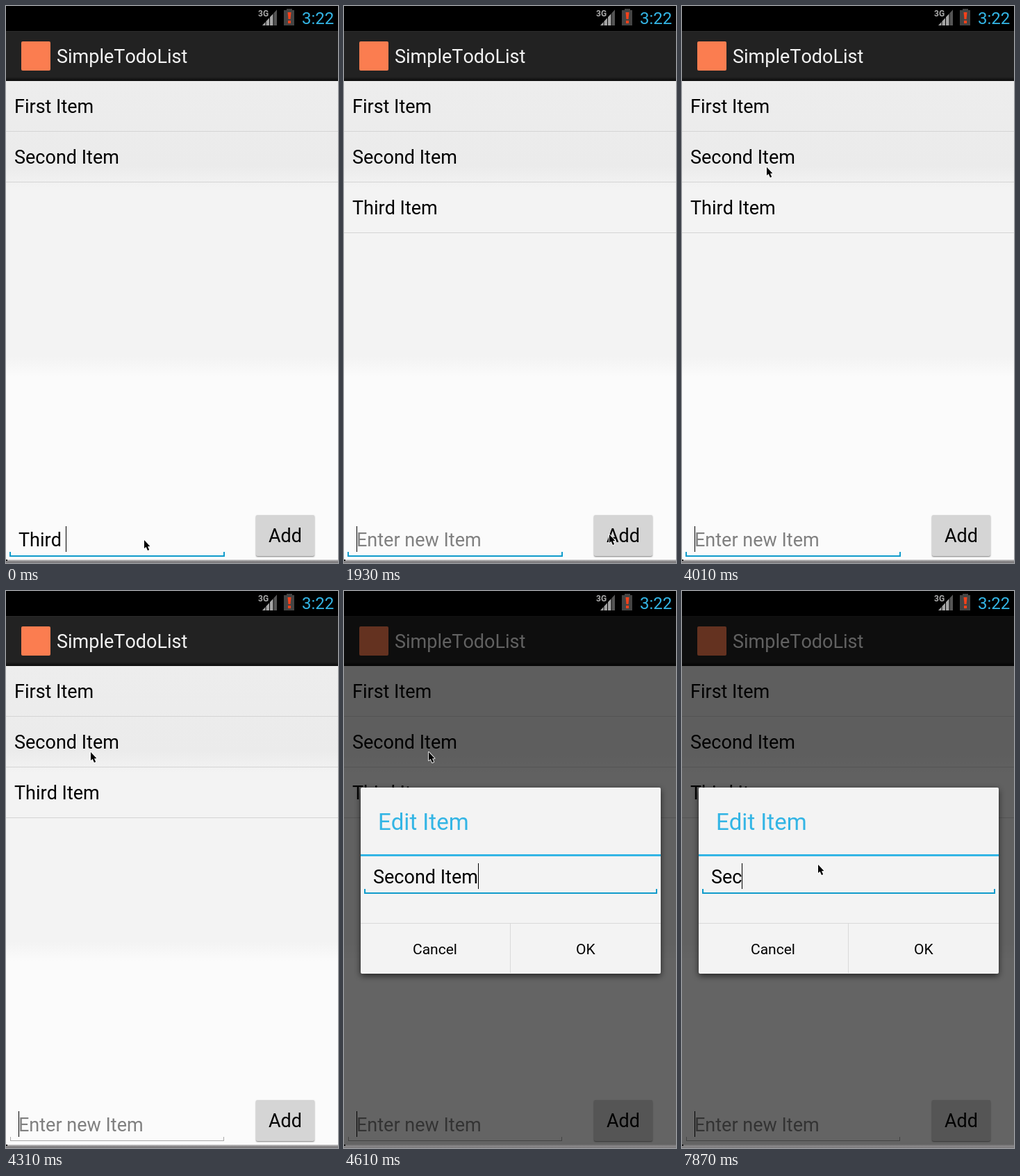
An HTML page with a canvas that plays this animation: 478 by 802 pixels, repeating every 8000 ms.

```html
<!DOCTYPE html>
<html lang="en">
<head>
<meta charset="utf-8">
<style>
html, body { margin: 0; width: 478px; height: 802px; overflow: hidden; background: #000; }
canvas { display: block; }
</style>
</head>
<body>
<canvas width="478" height="802"></canvas>
<script>
const LOOP = 8000;
const ctx = document.querySelector('canvas').getContext('2d');
ctx.fontKerning = 'none';
ctx.lineJoin = 'round';

// Each track is a list of [start time, value...]; a value holds until the next one.
const pointer = [
  [0, 199, 769], [1340, 255, 768], [1490, 340, 764], [1640, 382, 761],
  [2380, 320, 660], [2530, 205, 453], [2680, 118, 211], [3120, 118, 226],
  [3420, 122, 232], [4900, 188, 384], [5050, 196, 394]
];
const newItem = [
  [0, 'Third '], [450, 'Third I'], [600, 'Third It'], [890, 'Third Ite'],
  [1040, 'Third Item'], [1780, '']
];
const newCaret = [[0, 1], [2530, 0], [2970, 1], [3570, 0], [4010, 1]];
const edited = [
  [0, 'Second Item'], [6390, 'Second Ite'], [6540, 'Second It'], [6980, 'Second I'],
  [7130, 'Second '], [7430, 'Second'], [7580, 'Secon'], [7730, 'Seco'], [7870, 'Sec']
];
const editCaret = [[0, 1], [4900, 0], [5350, 1], [5940, 0], [6390, 1]];
const dim = [[0, 0], [4460, 0.36], [4610, 0.6]];

const at = (track, t) => track.filter(k => k[0] <= t).pop().slice(1);

function rect(x, y, w, h, color) {
  ctx.fillStyle = color;
  ctx.fillRect(x, y, w, h);
}

function fade(y, h, ...stops) {
  const g = ctx.createLinearGradient(0, y, 0, y + h);
  stops.forEach((c, i) => g.addColorStop(i / (stops.length - 1), c));
  rect(0, y, 478, h, g);
}

function text(str, x, y, color = '#000', size = 27, weight = 400) {
  ctx.font = `${weight} ${size}px Roboto, sans-serif`;
  ctx.fillStyle = color;
  ctx.fillText(str, x, y);
}

function shape(points, color, outline) {
  ctx.beginPath();
  points.forEach(p => ctx.lineTo(...p));
  ctx.closePath();
  if (outline) {
    ctx.strokeStyle = outline;
    ctx.lineWidth = 2;
    ctx.stroke();
  }
  ctx.fillStyle = color;
  ctx.fill();
}

function box(x, y, w, h, color, shadow = 'transparent', blur = 0, dy = 0) {
  ctx.save();
  ctx.shadowColor = shadow;
  ctx.shadowBlur = blur;
  ctx.shadowOffsetY = dy;
  ctx.fillStyle = color;
  ctx.beginPath();
  ctx.roundRect(x, y, w, h, 2);
  ctx.fill();
  ctx.restore();
}

function underline(x, y, w, focused) {
  const color = focused ? '#0f9bcb' : '#a8a8a8', line = focused ? 2 : 1;
  rect(x, y, w, line, color);
  rect(x, y - 5, line, 5, color);
  rect(x + w - line, y - 5, line, 5, color);
}

function field(str, x, y, caret) {
  text(str, x, y);
  if (caret) rect(Math.round(x + ctx.measureText(str).width - 0.2), y - 29, 1, 37, '#000');
}

function statusBar() {
  rect(0, 0, 478, 36, '#000');
  text('3G', 363, 15, '#aaa', 12, 700);
  for (let i = 0; i < 4; i++) {
    const x = 369 + i * 5.5, top = 28 - (x - 369) * 1.08;
    shape([[x, 28], [x, top], [x + 4.5, top - 4.9], [x + 4.5, 28]], i < 3 ? '#a6a6a6' : '#555');
  }
  rect(404, 4, 8, 3, '#444');
  rect(400, 6, 15, 22, '#444');
  shape([[405.5, 9], [410.5, 9], [409.5, 19], [406.5, 19]], '#f4411b');
  rect(406, 21, 4, 4, '#f4411b');
  text('3:22', 426, 26, '#33b5e5', 24);
}

function header() {
  rect(0, 36, 478, 72, '#222');
  rect(0, 36, 478, 1, '#2c2c2c');
  fade(103, 5, '#1e1e1e', '#0c0c0c');
  box(22, 51, 42, 42, '#fb7d50');
  text('SimpleTodoList', 73, 82, '#f3f3f3');
}

function list(items) {
  fade(108, 122, '#ededed', '#ebebeb');
  fade(230, 32, '#ebebeb', '#f3f3f3');
  rect(0, 262, 478, 243, '#f3f3f3');
  fade(505, 29, '#f3f3f3', '#fbfbfb');
  rect(0, 534, 478, 268, '#fbfbfb');
  items.forEach((item, i) => {
    text(item, 12, 154 + 73 * i);
    rect(0, 180 + 73 * i, 478, 1, '#d4d4d4');
  });
}

function entryBar(t, focused) {
  const [str] = at(newItem, t);
  if (!str) text('Enter new Item', 18, 778, '#808080');
  field(str, 18, 778, at(newCaret, t)[0]);
  if (focused) underline(5, 791, 310, true);
  else underline(6, 791, 308, false);
  box(360, 733, 84, 59, '#d5d5d5', 'rgba(0,0,0,.5)', 2, 1);
  text('Add', 378, 772);
}

function dialog(t) {
  box(24, 283, 432, 268, '#f3f3f3', 'rgba(0,0,0,.65)', 10, 3);
  text('Edit Item', 49, 344, '#33b5e5', 33);
  rect(24, 379, 432, 3, '#33b5e5');
  field(at(edited, t)[0], 42, 421, at(editCaret, t)[0]);
  underline(29, 434, 422, true);
  rect(24, 478, 432, 1, '#d9d9d9');
  rect(239, 478, 1, 72, '#d9d9d9');
  text('Cancel', 99, 523, '#000', 21);
  text('OK', 334, 523, '#000', 21);
}

function arrow(x, y) {
  const outline = [[0, 0], [0, 12], [2.6, 9.8], [5, 15], [7.2, 14], [5, 9.2], [8.4, 9]];
  shape(outline.map(([a, b]) => [x + a, y + b]), '#000', 'rgba(255,255,255,.8)');
}

function draw(t) {
  const [shade] = at(dim, t);
  const items = ['First Item', 'Second Item'];
  if (t >= 1780) items.push('Third Item');
  list(items);
  entryBar(t, t < 4310);
  header();
  if (shade) {
    rect(0, 36, 478, 766, `rgba(0,0,0,${shade})`);
    dialog(t);
  }
  statusBar();
  fade(797, 5, shade ? '#686868' : '#dcdcdc', '#8a888a', '#777577');
  rect(0, 797, 2, 2, '#111');
  arrow(...at(pointer, t));
}

function frame() {
  draw(performance.now() % LOOP);
  requestAnimationFrame(frame);
}
frame();
</script>
</body>
</html>
```
